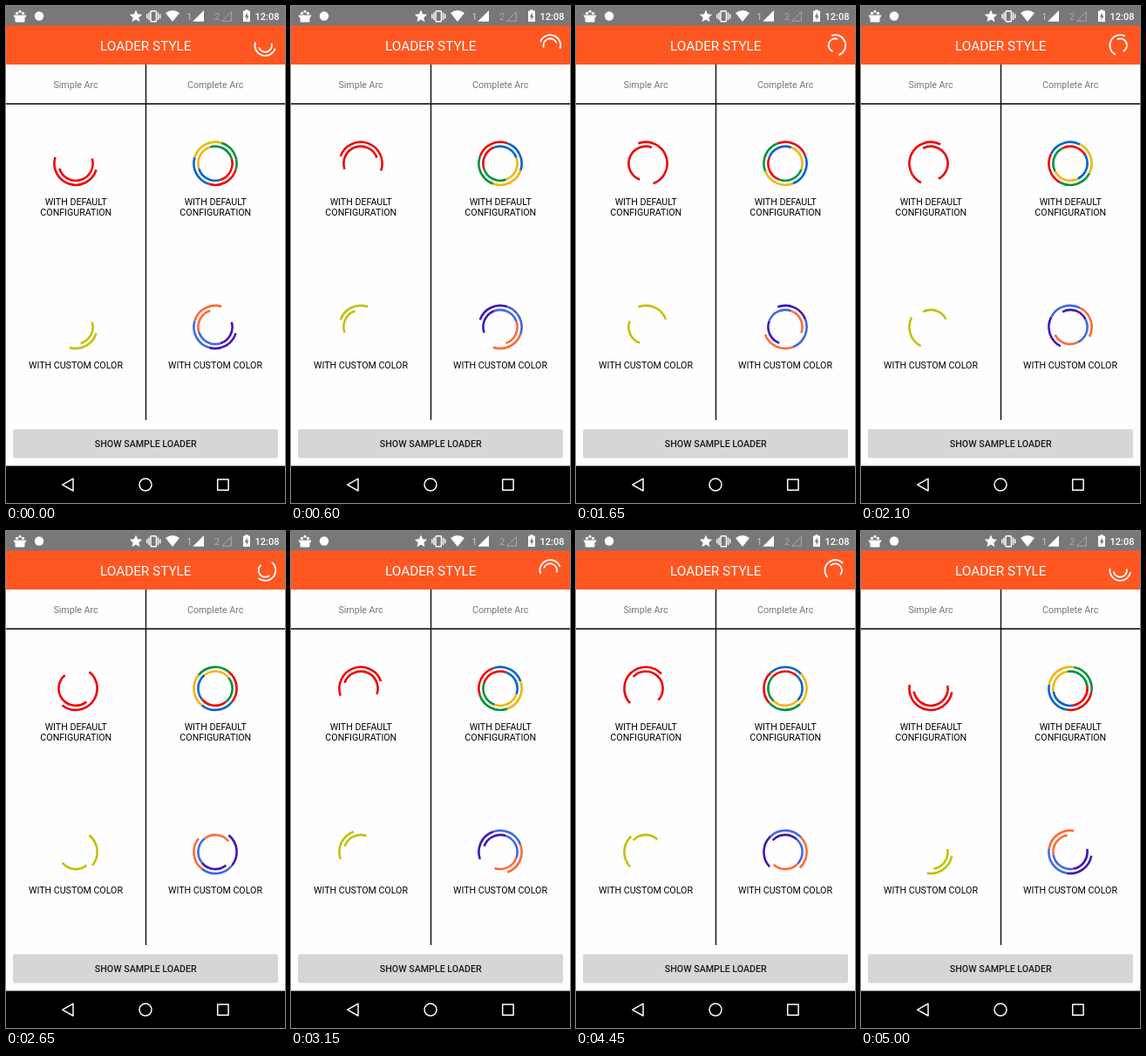
Recreate the animation shown at these times as an HTML page. Size 320 by 569 pixels, loop 5.05 s.

```html
<!DOCTYPE html>
<html lang="en">
<head>
<meta charset="utf-8">
<title>Loader style</title>
<style>
  html, body { margin: 0; width: 100%; height: 100%; overflow: hidden; background: #fff; }
  svg { display: block; width: 100%; height: 100%; }
  text { font-family: Roboto, sans-serif; text-anchor: middle; }
  .label { font-size: 10.67px; fill: #000; }
  .tab { font-size: 10.67px; fill: #757575; }
</style>
</head>
<body>
<svg viewBox="0 0 320 569" preserveAspectRatio="none">
  <rect width="320" height="569" fill="#fefefe"/>

  <!-- status bar -->
  <rect width="320" height="23" fill="#7a7777"/>
  <g fill="#fff">
    <path d="M8.5 10.5H23.5L22.3 13.2H21.5V17.5Q21.5 18.5 20.5 18.5H11.5Q10.5 18.5 10.5 17.5V13.2H9.7Z"/>
    <circle cx="12.5" cy="8.3" r="1.6"/>
    <circle cx="16" cy="6.3" r="1.6"/>
    <circle cx="19.5" cy="8.3" r="1.6"/>
    <circle cx="38" cy="11.5" r="5.2"/>
    <path d="M149 4.6L151.1 9.3L156.2 9.8L152.4 13.2L153.5 18.2L149 15.6L144.5 18.2L145.6 13.2L141.8 9.8L146.9 9.3Z"/>
    <path d="M183 8Q191 1.9 199 8L191 18Z"/>
    <path d="M227 5V17.7H214.2Z"/>
    <path d="M274.4 5.6V4.3H277.6V5.6H279.4Q280 5.6 280 6.3V17.4Q280 18.1 279.4 18.1H272.6Q272 18.1 272 17.4V6.3Q272 5.6 272.6 5.6Z"/>
  </g>
  <path d="M276.8 7.6L273.7 12.6H275.6V16.3L278.5 11.2H276.8Z" fill="#7a7777"/>
  <g fill="none" stroke="#fff" stroke-width="1.4">
    <rect x="166" y="5.7" width="6.4" height="12" rx=".8"/>
    <path d="M164 7.5V16M174.5 7.5V16M161.8 9.3V14.2M176.7 9.3V14.2"/>
    <path d="M258.4 6.5V17.2H247.7Z" stroke="#aaa8a8" stroke-width="1"/>
  </g>
  <text x="210.3" y="16" font-size="11" fill="#c8c6c6">1</text>
  <text x="242" y="16" font-size="11" fill="#aaa8a8">2</text>
  <text x="299.5" y="15.8" font-size="11" font-weight="500" fill="#fff">12:08</text>

  <!-- header -->
  <rect y="22.5" width="320" height="44.5" fill="#ff5722"/>
  <text x="160.3" y="50.7" font-size="15.3" fill="#fff">LOADER STYLE</text>
  <text class="tab" x="80" y="93.7">Simple Arc</text>
  <text class="tab" x="240.2" y="93.7">Complete Arc</text>
  <path d="M0 112H320M160.5 67V474" stroke="#000" stroke-width="1.3"/>

  <g id="loaders" fill="none"></g>

  <g class="label">
    <text x="80.3" y="227.7">WITH DEFAULT</text>
    <text x="80.3" y="240.4">CONFIGURATION</text>
    <text x="240.3" y="227.7">WITH DEFAULT</text>
    <text x="240.3" y="240.4">CONFIGURATION</text>
    <text x="80" y="415">WITH CUSTOM COLOR</text>
    <text x="240" y="415">WITH CUSTOM COLOR</text>
  </g>

  <!-- button -->
  <rect x="8" y="484.6" width="304" height="33" rx="2" fill="#d6d6d7"/>
  <text x="160.3" y="504.5" font-size="10.67" font-weight="500" fill="#1c1c1c">SHOW SAMPLE LOADER</text>

  <!-- navigation bar -->
  <rect y="526.5" width="320" height="42.5" fill="#000"/>
  <g fill="none" stroke="#fff" stroke-width="1.5" stroke-linejoin="round">
    <path d="M77 541.2V555L64.7 548.1Z"/>
    <circle cx="160" cy="548" r="7"/>
    <rect x="242.7" y="542" width="12.4" height="12.2"/>
  </g>
</svg>
<script>
const LOOP = 5050, STEP = 50;
const RED = '#f00404', BLUE = '#0266c8', YELLOW = '#f2b50f', GREEN = '#00933b';
const OLIVE = '#c3c00c';

// Unwrapped rotation in degrees, joined linearly: [ms, angle]
const TURN = [[0, 17], [1200, -338], [2100, -603], [2650, -771],
              [3650, -1068], [4450, -1303], [5000, -1430], [5050, -1442]];

const LOADERS = [
  { x: 297.3, y: 45, radii: [11.9, 7.7], width: 1.8, sweep: 180, colors: ['#fff'] },
  { x: 80, y: 180.3, sweep: 180, colors: [RED] },
  { x: 240, y: 180.3, sweep: 90, colors: [RED, BLUE, YELLOW, GREEN] },
  { x: 80, y: 367.5, sweep: 90, colors: [OLIVE] },
  { x: 240, y: 367.5, sweep: 90, colors: ['#4316b4', '#4169e1', '#ff6a36'] }
];

const root = document.getElementById('loaders');
const rings = [];

function add(parent, tag, attrs) {
  const el = document.createElementNS(root.namespaceURI, tag);
  for (const key in attrs) el.setAttribute(key, attrs[key]);
  return parent.appendChild(el);
}

function arc(r, from, sweep) {
  const at = deg => {
    const a = deg * Math.PI / 180;
    return (r * Math.cos(a)).toFixed(3) + ' ' + (r * Math.sin(a)).toFixed(3);
  };
  return `M${at(from)}A${r} ${r} 0 0 1 ${at(from + sweep)}`;
}

for (const { x, y, radii = [24.6, 19.6], width = 2.6, sweep, colors } of LOADERS) {
  radii.forEach((r, i) => {
    const el = add(root, 'g', { 'stroke-width': width });
    colors.forEach((stroke, k) => add(el, 'path', { d: arc(r, k * sweep, sweep), stroke }));
    rings.push({ el, x, y, dir: i ? -1 : 1 });
  });
}

function angleAt(t) {
  const i = TURN.findIndex(key => key[0] > t);
  const [t0, a0] = TURN[i - 1], [t1, a1] = TURN[i];
  return a0 + (a1 - a0) * (t - t0) / (t1 - t0);
}

function draw(ms) {
  const t = Math.floor((ms % LOOP) / STEP) * STEP;
  const angle = angleAt(t);
  for (const { el, x, y, dir } of rings) {
    el.setAttribute('transform', `translate(${x} ${y}) rotate(${dir * angle})`);
  }
}

const start = performance.now();
function tick() {
  draw(performance.now() - start);
  requestAnimationFrame(tick);
}
tick();
</script>
</body>
</html>
```
